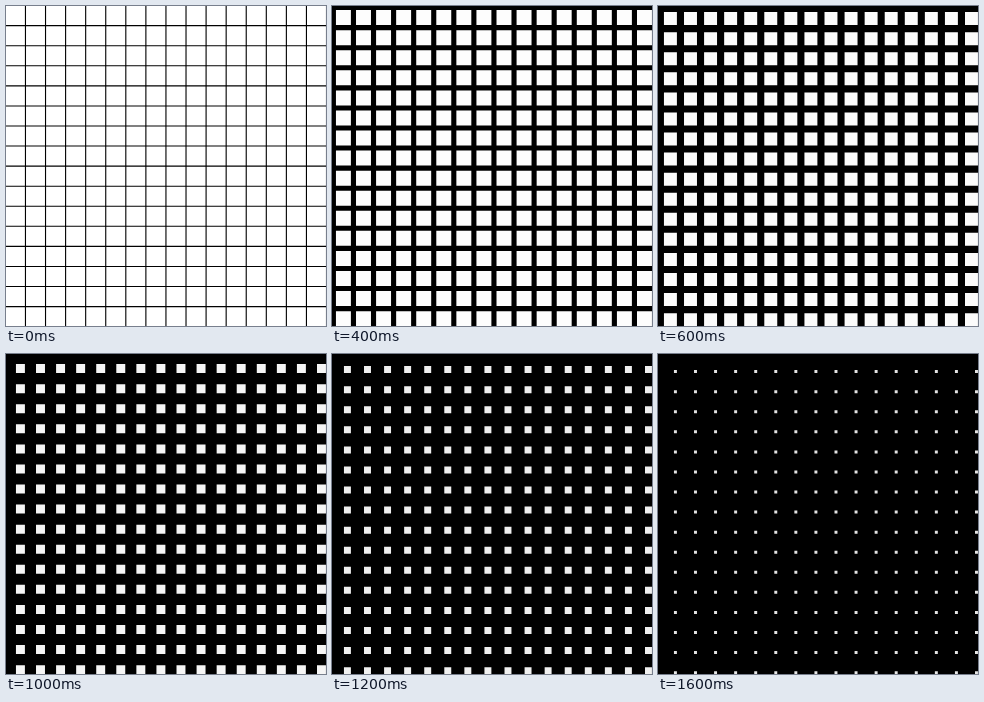
Recreate the animation shown at these times as an HTML page. Size 320 by 320 pixels, loop 1800 ms.

```html
<!DOCTYPE html>
<html lang="en">
<head>
<meta charset="utf-8">
<title>Closing grid</title>
<style>
  html, body { margin: 0; width: 100%; height: 100%; overflow: hidden; background: #000; }
  svg { display: block; width: 100%; height: 100%; }
</style>
</head>
<body>
<svg viewBox="0 0 320 320"><path id="cells"/></svg>
<script>
  const LOOP = 1800, STEP = 200, COUNT = 16, PITCH = 20.07;
  const cells = document.getElementById('cells');
  let shown = -1;

  // Each step moves the top-left corner of every cell towards its fixed far corner.
  function draw(step) {
    const left = 2 * step - 0.05, top = 2 * step + 0.1;
    const w = 18.9 - left, h = 19.1 - top;
    let d = '';
    for (let row = 0; row < COUNT; row++) {
      for (let col = 0; col < COUNT; col++) {
        const x = (col * PITCH + left).toFixed(2);
        const y = (row * PITCH + top).toFixed(2);
        d += `M${x} ${y}h${w}v${h}h${-w}z`;
      }
    }
    const tone = Math.round(255 - 0.42 * step * step);
    cells.setAttribute('d', d);
    cells.setAttribute('fill', `rgb(${tone},${tone},${tone})`);
  }

  function tick() {
    const step = Math.floor((performance.now() % LOOP) / STEP);
    if (step !== shown) draw(shown = step);
    requestAnimationFrame(tick);
  }
  tick();
</script>
</body>
</html>
```
